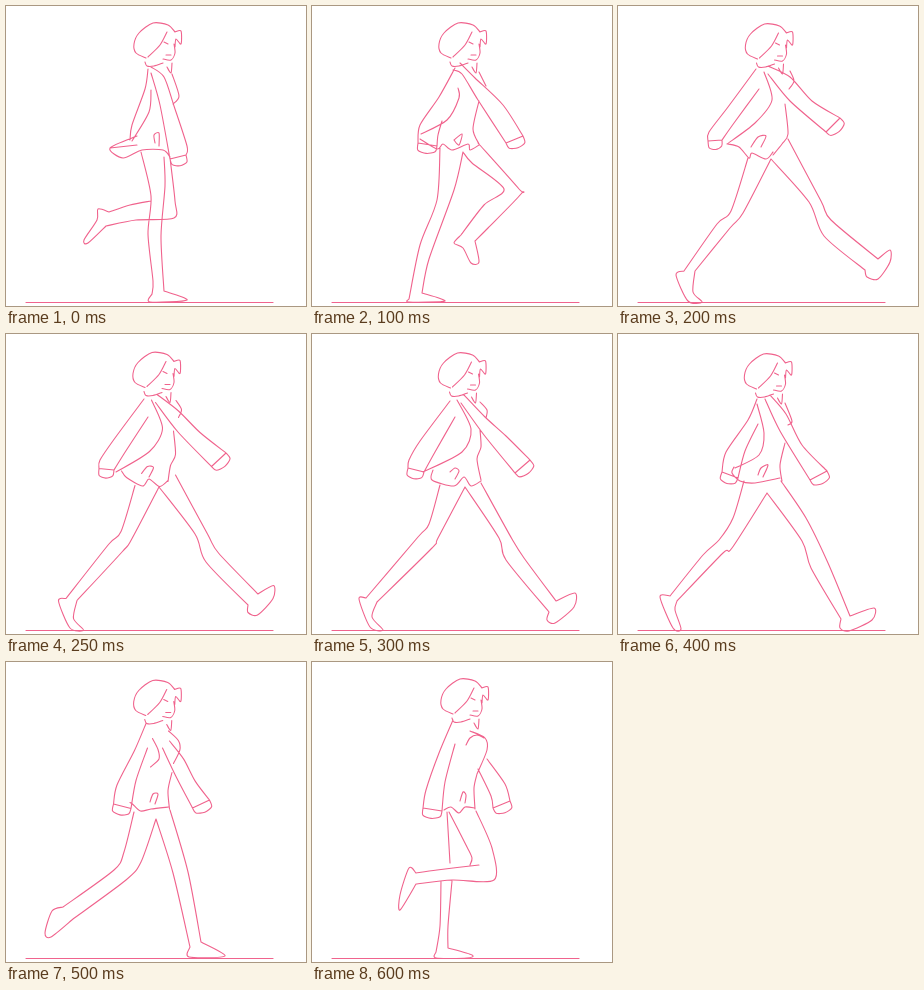
An HTML page that plays this animation: 300 by 300 pixels, repeating every 0.7 s.

```html
<!DOCTYPE html>
<html lang="en">
<head>
<meta charset="utf-8">
<title>Walk cycle</title>
<style>
  html, body { margin: 0; width: 100%; height: 100%; overflow: hidden; background: #fff; }
  svg { display: block; width: 100%; height: 100%; }
  path { fill: none; stroke: #f0638d; stroke-width: 1.1; stroke-linecap: round; stroke-linejoin: round; }
</style>
</head>
<body>
<svg viewBox="0 0 300 300">
  <path d="M20 296.5H267"/>
  <path id="figure"/>
</svg>
<script>
// "x,y x,y / x,y x,y": strokes separated by slashes.
const parse = text => text.split('/').map(stroke =>
  stroke.trim().split(/\s+/).map(point => point.split(',').map(Number)));

const head = (dx, dy) => parse(`140,52 130,47 128,38 133,27 147,17 162,19 169,26
  / 169,26 175,25 175,38 170,33 169,41 / 161,26 154,39 142,51
  / 168,38 169,47 165,54 157,53 / 158,36 162,38 / 160,49 165,49
  / 139,56 141,60 148,60 157,57 / 166,57 165,67 161,61`)
  .map(stroke => stroke.map(([x, y]) => [x + dx, y + dy]));

// Two sleeve edges, closed by a cuff and a rounded fist.
function arm(text) {
  const [upper, lower] = parse(text);
  const a = upper.at(-1), b = lower.at(-1), previous = upper.at(-2);
  const width = Math.hypot(b[0] - a[0], b[1] - a[1]);
  let normal = [(b[1] - a[1]) / width, (a[0] - b[0]) / width];
  const outward = normal[0] * (a[0] - previous[0]) + normal[1] * (a[1] - previous[1]);
  if (outward < 0) normal = normal.map(v => -v);
  const knuckle = (t, reach) => a.map((v, k) => v + (b[k] - v) * t + normal[k] * reach);
  return [upper, lower, [a, b], [a, knuckle(0.05, 7), knuckle(0.5, 9), knuckle(0.95, 6), b]];
}

// Two leg edges; the foot outline joins their ends.
function leg(text) {
  const [front, back, foot] = parse(text);
  return [front, back, [front.at(-1), ...foot, back.at(-1)]];
}

const passing = [
  ...head(0, 0),
  ...parse(`166,68 173,90 167,98 / 131,130 104,142 117,152 136,144 157,144 164,151
    / 104,142 131,139 / 149,137 148,129 153,127 153,140
    / 142,63 139,83 126,119 124,134 / 145,84 143,106 126,135`),
  ...arm('145,61 158,71 168,100 181,140 180,149 / 145,67 154,99 164,153'),
  ...leg('135,146 145,190 142,228 147,275 146,288 / 158,151 159,180 155,230 158,285 / 144,296 181,294'),
  ...leg('145,195 124,199 103,206 / 164,152 169,195 168,212 130,214 100,220 / 92,203 91,214 78,234 82,237')
];

const lift = [
  ...head(-1, 0),
  ...parse(`167,66 174,80 / 167,95 161,123 167,138
    / 108,133 125,143 131,138 140,144 156,138 158,144 167,139
    / 142,134 150,128 147,139 142,134 / 146,82 147,92 135,114 109,128`),
  ...arm('143,62 127,91 108,119 106,137 / 130,115 126,129 125,140'),
  ...arm('148,57 163,72 191,99 211,130 / 141,64 150,68 166,94 194,137'),
  ...leg('128,142 125,194 108,239 97,293 / 151,146 142,184 117,253 110,287 / 97,296 133,295'),
  ...leg('151,146 160,157 192,183 172,199 149,229 / 166,137 207,183 209,188 176,222 163,235 / 142,237 151,242 159,257 167,256')
];

const stride = [
  ...head(-0.5, 1),
  ...parse(`172,65 176,75 171,83 / 167,98 170,128 164,138 155,149
    / 110,138 121,141 131,152 134,147 148,153 155,146
    / 133,141 140,131 148,130 143,141 / 146,66 154,94 137,117 109,138`),
  ...arm('138,63 110,101 91,126 90,135 / 141,83 116,117 104,134'),
  ...arm('150,60 172,71 194,95 222,112 / 150,68 172,95 208,126'),
  ...leg('130,152 113,205 99,218 66,265 / 153,153 125,207 112,222 77,265 / 58,269 70,295 84,296 75,286'),
  ...leg('153,153 191,196 206,230 247,264 / 170,133 203,195 213,214 260,253 / 249,271 260,273 272,256 272,244')
];

const reach = [
  ...head(-1.5, 2),
  ...parse(`168,68 175,76 174,84 / 168,96 169,113 165,125 169,146
    / 121,136 120,146 142,152 152,143 159,152 169,147
    / 138,138 143,134 147,137 143,145 / 145,66 159,95 150,118 111,138`),
  ...arm('138,67 108,107 97,126 96,134 / 143,83 123,118 112,138'),
  ...arm('152,61 173,83 194,102 218,126 / 149,69 172,101 203,139'),
  ...leg('128,151 117,190 106,203 54,264 / 153,153 126,204 120,214 65,268 / 47,265 58,293 71,296 60,283'),
  ...leg('153,153 187,204 194,226 237,278 / 169,149 200,205 212,224 244,267 / 235,286 243,289 262,273 263,259')
];

const contactLegs = [
  ...leg('126,147 115,184 101,206 85,221 52,262 / 149,159 114,214 105,219 59,267 / 42,263 55,294 63,295 57,276'),
  ...leg('149,159 184,207 193,234 223,285 / 163,147 188,184 210,229 232,282 / 222,294 231,297 254,286 256,274')
];
const contactBody = [
  ...head(-1.5, 3),
  ...parse(`167,69 174,87 170,91 / 167,109 162,131 164,147
    / 116,133 114,139 122,147 137,149 162,144
    / 140,141 143,134 150,131 145,143 / 139,70 146,99 141,121 117,134`),
  ...arm('139,65 130,86 108,118 104,138 / 140,90 127,117 120,144'),
  ...arm('152,61 168,80 184,111 209,137 / 147,65 162,97 192,146')
];

const loadLegs = [
  ...leg('128,150 118,190 108,208 57,245 / 150,157 135,200 120,218 67,257 / 46,249 39,271 45,275'),
  ...leg('150,157 167,211 184,285 / 164,148 182,210 195,280 / 183,295 219,294')
];

const foldLegs = [
  ...leg('167,203 125,208 104,211 / 164,149 180,186 182,218 140,218 104,222 / 97,206 88,233 88,248'),
  ...leg('129,219 128,264 124,290 / 140,219 136,264 136,286 / 124,296 155,296 160,293'),
  ...parse('137,150 155,185 160,196 158,203 / 135,150 138,201')
];
const foldBody = [
  ...head(1, 0),
  ...parse(`158,69 173,76 175,88 165,112 / 165,112 162,126 163,147
    / 132,148 139,145 147,151 153,145 163,146
    / 148,139 151,130 154,133 153,141 / 154,83 158,76 165,73 172,76`),
  ...arm('141,58 127,91 114,128 111,146 / 143,82 133,120 130,149'),
  ...arm('175,97 193,122 198,139 / 166,107 179,134 181,146')
];

// Point at u = 0..1 along a stroke, so strokes of unlike length can be blended.
function sample(stroke, u) {
  const at = u * (stroke.length - 1), i = Math.min(Math.floor(at), stroke.length - 2);
  return stroke[i].map((v, k) => v + (stroke[i + 1][k] - v) * (at - i));
}

const blend = (a, b) => a.map((stroke, s) => {
  const last = Math.max(stroke.length, b[s].length) - 1;
  return Array.from({ length: last + 1 }, (_, i) => {
    const p = sample(stroke, i / last), q = sample(b[s], i / last);
    return p.map((v, k) => (v + q[k]) / 2);
  });
});

function smooth(points) {
  const pull = 1 / 7;
  let d = `M${points[0]}`;
  for (let i = 0; i < points.length - 1; i++) {
    const a = points[i], b = points[i + 1];
    const before = points[i - 1] || a, after = points[i + 2] || b;
    const c1 = a.map((v, k) => v + (b[k] - before[k]) * pull);
    const c2 = b.map((v, k) => v - (after[k] - a[k]) * pull);
    d += `C${c1} ${c2} ${b}`;
  }
  return d;
}

const pose = (start, strokes) => ({ start, d: strokes.map(smooth).join('') });
const timeline = [
  pose(0, passing),
  pose(100, lift),
  pose(200, stride),
  pose(250, blend(stride, reach)),
  pose(300, reach),
  pose(400, [...contactBody, ...contactLegs]),
  pose(500, [...blend(contactBody, foldBody), ...loadLegs]),
  pose(600, [...foldBody, ...foldLegs])
];

const figure = document.getElementById('figure');
const origin = performance.now();

function draw() {
  const time = (performance.now() - origin) % 700;
  figure.setAttribute('d', timeline.findLast(step => step.start <= time).d);
  requestAnimationFrame(draw);
}
draw();
</script>
</body>
</html>
```
